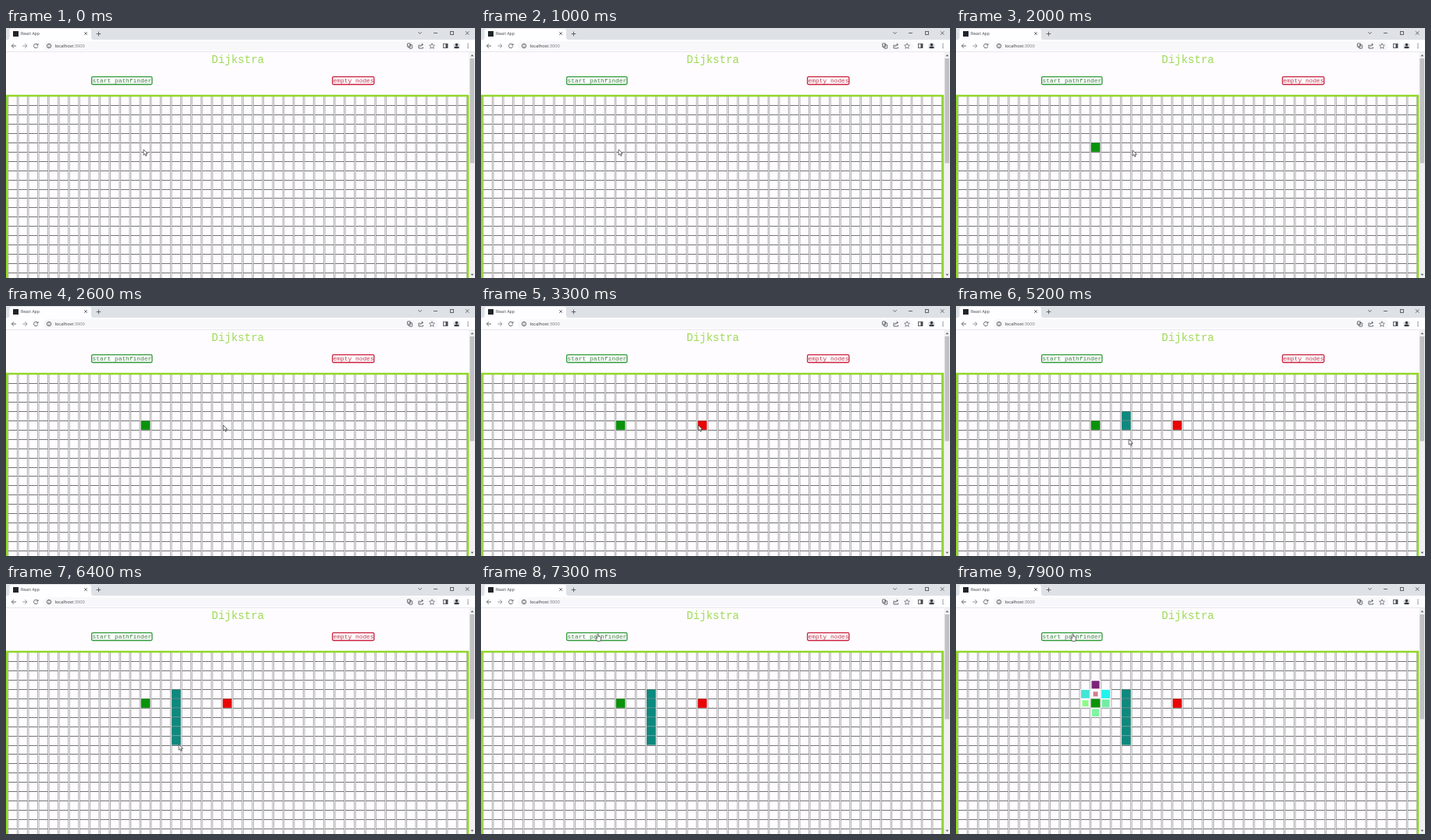
An HTML page that plays this animation: 600x321 px, repeating every 8000 ms.

```html
<!DOCTYPE html>
<html lang="en">
<head>
<meta charset="utf-8">
<title>Dijkstra</title>
<style>
  html, body { margin: 0; width: 100%; height: 100%; overflow: hidden; background: #fefcff; }
  svg { display: block; width: 600px; height: 321px; }
  text { font-family: "Open Sans", sans-serif; }
  .mono { font-family: "Liberation Mono", "Courier New", monospace; }
  .icon { fill: none; stroke: #55585d; stroke-width: .9; }
  .button rect { fill: #fefcff; stroke-width: 1.3; }
  .button text { font-size: 7.9px; }
</style>
</head>
<body>
<svg viewBox="0 0 600 321">
  <!-- tab strip -->
  <rect width="600" height="15" fill="#dee1e6"/>
  <path d="M2 15Q4.500 15 4.500 12V4Q4.500 1 7.500 1H106Q109 1 109 4V12Q109 15 112 15Z" fill="#fefdff"/>
  <rect x="9" y="4" width="7" height="7" fill="#20252b"/>
  <text x="19" y="9.400" font-size="5.100" fill="#3c4043">React App</text>
  <g class="icon">
    <path d="M100.200 5.300l3.600 3.600m0-3.600l-3.600 3.600"/>
    <path d="M115.700 7.500h5.600m-2.800-2.800v5.600"/>
    <path d="M527.300 5.200l2.200 2.200 2.200-2.200M547 6.500h5"/>
    <rect x="568.500" y="4.500" width="4" height="4"/>
    <path d="M588 4.300l4.400 4.400m0-4.400l-4.400 4.400"/>
  </g>

  <!-- toolbar -->
  <rect y="15" width="600" height="15.500" fill="#fefdff"/>
  <rect x="47" y="17" width="506" height="12" rx="6" fill="#f8f8fa"/>
  <rect y="30" width="600" height=".6" fill="#d9dbe0"/>
  <g class="icon">
    <path d="M13 23H7.300m2.700-2.700L7.300 23l2.700 2.700"/>
    <path d="M21.300 23H27m-2.700-2.700L27 23l-2.700 2.700" stroke="#8a8d92"/>
    <path d="M40.300 21.300A2.700 2.700 0 1 0 40.800 23.600M41 20v2h-2"/>
    <circle cx="55" cy="23" r="2.700"/>
    <path d="M55 22.600v2m0-3.500v.7"/>
    <rect x="513.500" y="19.800" width="4" height="4.500" rx=".5"/>
    <rect x="515.700" y="21.700" width="4" height="4.500" rx=".5"/>
    <path d="M529.500 22h-1.500v4h5.500v-1.500M529.800 24q.3-2.600 3.400-2.700m-1.400-1.600l1.700 1.600-1.700 1.600"/>
    <path d="M545 19.700l1 2.300 2.400.2-1.800 1.700.5 2.400-2.100-1.300-2.100 1.300.5-2.400-1.800-1.700 2.400-.2Z" stroke-width=".7"/>
    <rect x="559.500" y="20.300" width="5.500" height="5.200"/>
  </g>
  <rect x="562.500" y="20.300" width="2.500" height="5.200" fill="#44474c"/>
  <text x="62.500" y="25" font-size="5.700" fill="#303236">localhost<tspan fill="#74777c">:3000</tspan></text>
  <circle cx="576.500" cy="23" r="4" fill="#d5d8dd"/>
  <circle cx="576.500" cy="21.500" r="1.700" fill="#35383d"/>
  <path d="M573.300 26q0-2.500 3.200-2.500t3.200 2.500Z" fill="#35383d"/>
  <path d="M591 20.600v.01M591 23v.01M591 25.400v.01" stroke="#44474c" stroke-width="1.300" stroke-linecap="round"/>

  <!-- page -->
  <text class="mono" x="263" y="45" font-size="14" fill="#9fda55">Dijkstra</text>
  <g class="button">
    <rect x="109.600" y="62.700" width="77.300" height="9.800" rx="1.500" stroke="#2f9a38"/>
    <text class="mono" x="110.500" y="70.200" fill="#3d8440">start pathfinder</text>
  </g>
  <g class="button" id="empty">
    <rect x="417.600" y="62.700" width="53.300" height="9.800" rx="1.500" stroke="#c9203c"/>
    <text class="mono" x="418.500" y="70.200" fill="#c03a4c">empty nodes</text>
  </g>
  <path id="sides" fill="none" stroke="#909090" stroke-width=".7"/>
  <path id="rows" fill="none" stroke="#747474" stroke-width="1"/>
  <path d="M1.250 321V87H591V321" fill="none" stroke="#92d72a" stroke-width="2.600"/>
  <g id="cells"></g>

  <!-- scrollbar -->
  <rect x="592.600" y="30.600" width="7.400" height="291" fill="#f1f1f3"/>
  <rect x="593.400" y="39" width="5.700" height="134.500" fill="#c1c1c3"/>
  <path d="M594.500 36.300l1.900-2.200 1.900 2.200Z" fill="#606164"/>
  <path d="M594.500 315.800l1.900 2.200 1.900-2.200Z" fill="#606164"/>

  <g id="pointer" stroke="#333" stroke-width=".7" fill="#fff" stroke-linejoin="round">
    <path id="arrow" d="M0 0V7.200L1.700 5.700 2.800 8.300 4 7.800 2.900 5.300H5.200Z"/>
    <path id="hand" d="M-.8 5.500V.6Q0-.5.8.6V3.300L4 4.200V7L3.200 9.300H-.8L-3 6Q-2.800 4.700-.8 6Z"/>
  </g>
</svg>
<script>
const LOOP = 8000, STEP = 100;
const COLS = 45, ROWS = 20;
const cellX = c => 2.9 + 13.07 * c;
const cellY = r => 87.5 + 11.95 * r;
const WIDE = 11.4, HIGH = 11.3;
const $ = id => document.getElementById(id);

let sides = "", lines = "";
for (let c = 0; c < COLS; c++) {
  sides += `M${cellX(c)} 88V321M${cellX(c) + WIDE} 88V321`;
  for (let r = 0; r < ROWS; r++) {
    lines += `M${cellX(c)} ${Math.floor(cellY(r)) + .5}h${WIDE}`;
  }
}
$("sides").setAttribute("d", sides);
$("rows").setAttribute("d", lines);

function addRect(x, y, w, h, fill) {
  const rect = document.createElementNS("http://www.w3.org/2000/svg", "rect");
  const attrs = { x, y, width: w, height: h, fill };
  for (const key in attrs) rect.setAttribute(key, attrs[key]);
  return $("cells").appendChild(rect);
}

const show = (el, on) => el.setAttribute("visibility", on ? "visible" : "hidden");

// Solid cells: column, row, start time, colour
const solids = [[13, 5, 1400, "#0a930a"], [21, 5, 2800, "#e90505"]];
[4700, 5000, 5300, 5500, 5800, 6100].forEach((t, i) =>
  solids.push([16, 4 + i, t, "#0e897e"]));
const blocks = solids.map(([c, r, start, fill]) => ({
  start, el: addRect(cellX(c), cellY(r) + .3, WIDE, HIGH, fill)
}));

// Visited cells: column, row, start time, colour, size reached
const END = 7900;
const visited = [
  [13, 4, 7500, "#cf7f92", 6],
  [14, 5, 7500, "#72eda5", 10],
  [13, 6, 7500, "#80f5a2", 9.5],
  [12, 5, 7600, "#8dfb88", 8],
  [13, 3, 7600, "#7b2478", 10],
  [14, 4, 7700, "#20f4ee", 11],
  [12, 4, 7700, "#40e6d6", 10.8]
].map(([c, r, start, fill, size]) => ({
  start, size,
  cx: cellX(c) + WIDE / 2, cy: cellY(r) + 6,
  back: addRect(cellX(c) - .5, cellY(r) - .5, WIDE + 1, 12.5, "#fefcff"),
  el: addRect(0, 0, 0, 0, fill)
}));

// Pointer path: time, x, y
const path = [
  [0, 176, 156], [1800, 176, 156], [2000, 226, 157], [2400, 278, 153],
  [3600, 278, 153], [4200, 223, 131], [4500, 223, 131], [4700, 222, 139],
  [5200, 221, 171], [5400, 221, 184], [6100, 221, 206], [6400, 221, 206],
  [7100, 149.500, 64], [LOOP, 149.500, 64]
];

function pointerAt(t) {
  const i = path.findIndex(p => p[0] > t);
  const [t0, x0, y0] = path[i - 1], [t1, x1, y1] = path[i];
  const k = (t - t0) / (t1 - t0);
  return [x0 + (x1 - x0) * k, y0 + (y1 - y0) * k];
}

function draw(t) {
  for (const b of blocks) show(b.el, t >= b.start);
  for (const v of visited) {
    const on = t >= v.start;
    show(v.back, on);
    show(v.el, on);
    const k = Math.min(1, Math.max(0, (t - v.start) / (END - v.start)));
    const s = v.size * (.3 + .7 * k);
    v.el.setAttribute("x", v.cx - s / 2);
    v.el.setAttribute("y", v.cy - s / 2);
    v.el.setAttribute("width", s);
    v.el.setAttribute("height", s);
  }
  show($("empty"), t < 7400);
  const [x, y] = pointerAt(t);
  $("pointer").setAttribute("transform", `translate(${x} ${y})`);
  const overButton = x > 109 && x < 187 && y > 62 && y < 73;
  show($("arrow"), !overButton);
  show($("hand"), overButton);
}

const begin = performance.now();
function tick() {
  const t = Math.max(0, performance.now() - begin) % LOOP;
  draw(Math.floor(t / STEP) * STEP);
  requestAnimationFrame(tick);
}
tick();
</script>
</body>
</html>
```
